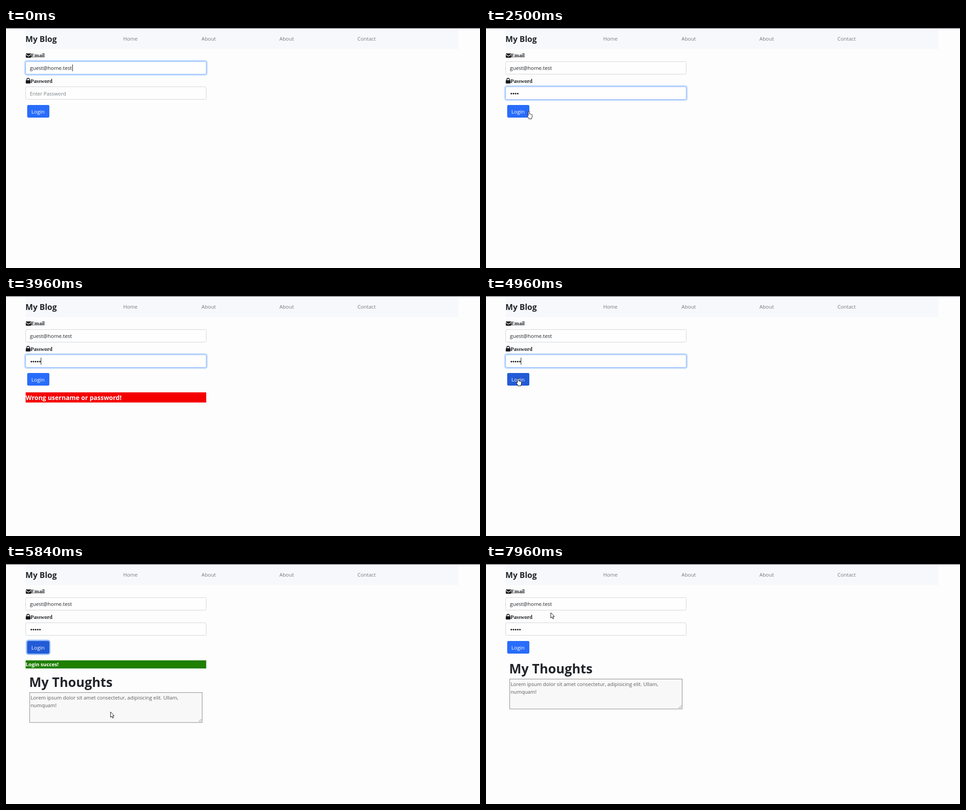
Write an HTML page that moves like this. It is 1050x533 px and loops after 8000 ms.

```html
<!DOCTYPE html>
<html lang="en">
<head>
<meta charset="utf-8">
<title>My Blog</title>
<style>
  html, body { margin: 0; width: 100%; height: 100%; overflow: hidden; background: #fdfdfd; }
  svg { display: block; width: 100vw; height: 100vh; }
  text { font: 11.3px "Open Sans", "Noto Sans", sans-serif; fill: #212529; white-space: pre; }
  .bold { font-weight: 700; }
  .nav { fill: #77797c; }
  .label { font: bold 11.8px "Liberation Serif", "Noto Serif", serif; }
  .hint { fill: #787d82; font-size: 11.1px; }
  .note { fill: #5c5c5c; font-size: 11.2px; }
  .light { fill: #fff; }
  .field { fill: #fff; fill-opacity: .6; stroke: #cdd2d7; }
  .ring { fill: none; stroke-width: 3; }
  .caret { stroke: #111; }
</style>
</head>
<body>
<svg viewBox="0 0 1050 533" preserveAspectRatio="none">
  <rect width="1050" height="533" fill="#fdfdfd"/>
  <rect x="44" y="1" width="958" height="46" fill="#f7f8fb"/>
  <rect width="1050" height="1" fill="#2b2b3d"/>
  <text class="bold" x="43" y="31" style="font-size:17.7px">My Blog</text>
  <g id="nav"></g>

  <g fill="#16191c">
    <path d="M45 56.5h9.6q1.2 0 1.2 1.2L50.4 61.600q-.6.4-1.200 0L43.800 57.700q0-1.200 1.200-1.200z"/>
    <path d="M43.800 59.200l4.800 3.500q1.200.8 2.400 0l4.800-3.500v5.400q0 1.300-1.300 1.300h-9.400q-1.300 0-1.300-1.300z"/>
    <rect x="43.800" y="116" width="10.400" height="7.300" rx="1.400"/>
    <path d="M46.200 117v-2.600a2.800 2.800 0 0 1 5.600 0v2.600" fill="none" stroke="#16191c" stroke-width="1.600"/>
  </g>
  <text class="label" x="55.5" y="65.300">Email</text>
  <text class="label" x="54.200" y="121.500">Password</text>

  <g id="email">
    <rect class="ring" x="41.800" y="72.800" width="403.400" height="31.400" rx="4.500" stroke="#c3dafe"/>
    <rect class="field" x="43.500" y="74.500" width="400" height="28" rx="3"/>
    <text x="53" y="93" style="font-size:11.4px">guest@home.test</text>
  </g>
  <g id="pass">
    <rect class="ring" x="41.800" y="128.800" width="403.400" height="31.400" rx="4.500" stroke="#c3dafe"/>
    <rect class="field" x="43.500" y="130.500" width="400" height="28" rx="3"/>
    <text class="hint" id="hint" x="52.700" y="149.500">Enter Password</text>
    <g id="dots" fill="#16191c"></g>
  </g>
  <path class="caret" id="caret"/>

  <rect class="ring" id="btnRing" x="45.500" y="169.500" width="51.500" height="31" rx="4.500" stroke="#98bffc"/>
  <rect id="btn" x="47" y="171" width="49" height="28" rx="3"/>
  <text class="light" x="56.300" y="189.500" style="font-size:11.500px">Login</text>

  <g id="error">
    <rect x="43.500" y="214" width="400" height="22.500" fill="#f40000"/>
    <text class="bold light" x="43.500" y="231" style="font-size:14px">Wrong username or password!</text>
  </g>
  <g id="success">
    <rect x="43.500" y="214" width="400" height="18" fill="#1f7f00"/>
    <text class="bold light" x="43.500" y="227.300" style="font-size:11.200px">Login succes!</text>
  </g>
  <g id="thoughts">
    <text class="bold" x="51.300" y="273" style="font-size:28.700px">My Thoughts</text>
    <rect x="52.500" y="285.500" width="382" height="66.500" fill="#f8f8f8" stroke="#858585"/>
    <text class="note" x="54.500" y="300.500">Lorem ipsum dolor sit amet consectetur, adipisicing elit. Ullam,</text>
    <text class="note" x="54.500" y="318.300">numquam!</text>
    <path d="M427 350.500l6-6M431 350.500l2-2" stroke="#777"/>
  </g>

  <g id="mouse">
    <path id="arrow" d="M.5 .5v12l2.700-2.500 1.900 4.300 2-.9-1.900-4.100h3.500z" fill="#fff" stroke="#111"/>
    <path id="beam" d="M-2.500-5.500h1.800l.7.700.7-.7h1.800M0-5v10M-2.500 5.500h1.800l.7-.7.7.7h1.800" fill="none" stroke="#333"/>
    <path id="hand" d="M-1.300 9V1a1.300 1.300 0 0 1 2.600 0v5q1.200-.9 2.200.4 1.200-.6 2 .5 1.700-.4 1.800 1.300v3.500q0 2-1.300 3.300v1.800h-6.200v-1.500q-2-2.200-3.400-5.200-.3-1.700 1-1.500.7.300 1.300 1.400z" fill="#fff" stroke="#111"/>
  </g>
</svg>
<script>
const LOOP = 8000, FADE = 150;
const $ = id => document.getElementById(id);
const NS = "http://www.w3.org/2000/svg";

function add(parent, tag, attrs, text = "") {
  const el = document.createElementNS(NS, tag);
  for (const key in attrs) el.setAttribute(key, attrs[key]);
  el.textContent = text;
  return parent.appendChild(el);
}

[["Home", 259.4], ["About", 433], ["About", 605.8], ["Contact", 778.4]]
  .forEach(([name, x]) => add($("nav"), "text", { class: "nav", x, y: 28 }, name));
const dots = [0, 1, 2, 3, 4].map(i =>
  add($("dots"), "circle", { cx: 56.1 + 4.75 * i, cy: 145.7, r: 1.75 }));

// Times at which each state switches, off to on and back.
const emailFocus = [-FADE, 850];
const passFocus = [850, 2720, 3450, 5100];
const btnFocus = [2720, 3450, 5100, 7350];
const btnDark = [2500, 3450, 4780, 7350];
const errorShown = [2870, 4860];
const successShown = [5240, 7300];
const mouseShown = [130, 1210, 2090, 3700, 4210, LOOP];
const emailCaret = [0, 90, 590, 850];
const passCaret = [1000, 2090, 2590, 2720, 3600, 4460, 4750, 5100];
const typed = [1290, 1470, 1660, 1850, 3950];

// Time, x, y of the pointer.
const path = [
  [90, 808, 2], [670, 204.5, 153], [2090, 204.5, 153], [2500, 95, 185], [2630, 95, 185],
  [2760, 82, 188], [2920, 82, 188], [3210, 118.5, 148], [4210, 118.5, 148],
  [4590, 104, 190], [4750, 104, 190], [4960, 71, 183], [5300, 71, 183],
  [5540, 150, 240], [5590, 160, 250], [5840, 231, 327.5], [6000, 238, 398],
  [6500, 238, 398], [7000, 233, 347], [7210, 233, 347], [7600, 167, 165], [7960, 143, 107.5]
];

const passed = (t, times) => times.filter(at => t >= at).length;
const isOn = (t, times) => passed(t, times) % 2 === 1;
const clamp = v => Math.min(1, Math.max(0, v));
const show = (el, on) => { el.style.display = on ? "" : "none"; };

// 0..1, easing for FADE ms after each switch
function level(t, times) {
  const n = passed(t, times);
  if (!n) return 0;
  const k = clamp((t - times[n - 1]) / FADE), eased = 1 - (1 - k) ** 3;
  return n % 2 ? eased : 1 - eased;
}

function mix(a, b, k) {
  return `rgb(${a.map((v, i) => Math.round(v + (b[i] - v) * k))})`;
}

function pointer(t) {
  const i = path.findIndex(p => p[0] > t);
  if (i === 0) return path[0].slice(1);
  if (i < 0) return path[path.length - 1].slice(1);
  const [t0, x0, y0] = path[i - 1], [t1, x1, y1] = path[i];
  const k = (t - t0) / (t1 - t0);
  return [x0 + (x1 - x0) * k, y0 + (y1 - y0) * k];
}

function drawField(id, focus) {
  const [ring, box] = $(id).querySelectorAll("rect");
  ring.style.opacity = focus;
  box.style.stroke = mix([205, 210, 215], [134, 183, 254], focus);
}

function drawMouse(t) {
  const [x, y] = pointer(t);
  const inField = x > 44 && x < 443 && (y > 75 && y < 103 || y > 131 && y < 159);
  const onButton = x > 47 && x < 96 && y > 171 && y < 199;
  show($("mouse"), isOn(t, mouseShown));
  show($("beam"), inField);
  show($("hand"), onButton);
  show($("arrow"), !inField && !onButton);
  $("mouse").setAttribute("transform", `translate(${x} ${y})`);
}

function draw(t) {
  const count = passed(t, typed);
  drawField("email", level(t, emailFocus));
  drawField("pass", level(t, passFocus));
  show($("hint"), !count);
  dots.forEach((dot, i) => show(dot, i < count));

  const inEmail = isOn(t, emailCaret);
  show($("caret"), inEmail || isOn(t, passCaret));
  $("caret").setAttribute("d", inEmail ? "M147.5 81v15" : `M${Math.round(53 + 4.8 * count) + .5} 137v15.5`);

  $("btnRing").style.opacity = level(t, btnFocus);
  $("btn").style.fill = mix([40, 108, 251], [34, 91, 214], level(t, btnDark));

  show($("error"), isOn(t, errorShown));
  show($("success"), isOn(t, successShown));
  show($("thoughts"), t >= successShown[0]);
  $("thoughts").setAttribute("transform", `translate(0 ${t < successShown[1] ? 0 : -30})`);
  drawMouse(t);
}

const start = performance.now();
function tick() {
  draw((performance.now() - start) % LOOP);
  requestAnimationFrame(tick);
}
tick();
</script>
</body>
</html>
```
